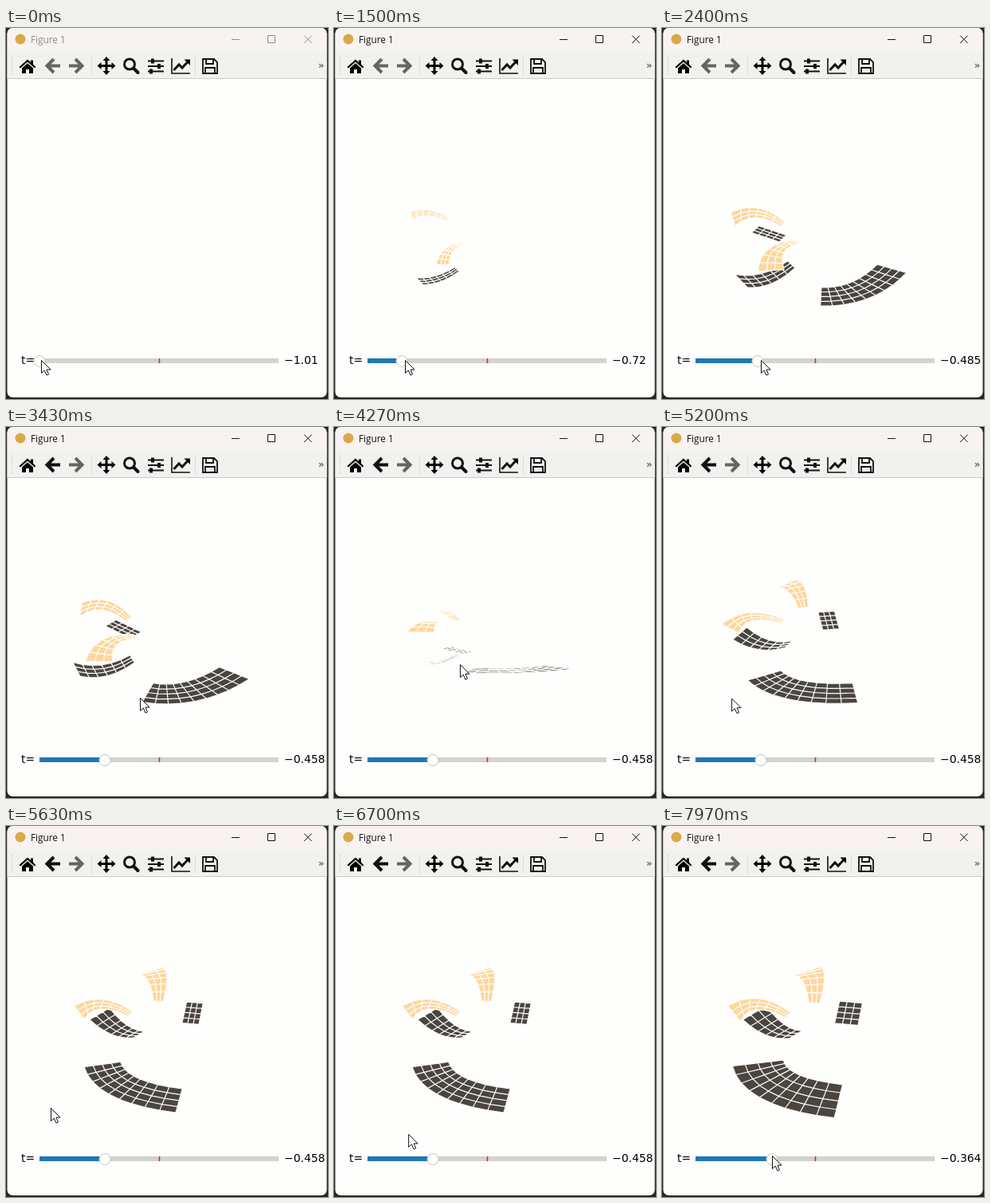
Animation, 404 px wide and 466 px high, one loop 8 s. Source, as an HTML page:

```html
<!DOCTYPE html>
<html lang="en">
<head>
<meta charset="utf-8">
<title>Figure 1</title>
<style>
html, body { margin: 0; width: 100%; height: 100%; overflow: hidden; background: #262622; }
svg { display: block; width: 404px; height: 466px; }
.plot { font: 13.9px "DejaVu Sans", sans-serif; }
.title { font: 11.8px "Open Sans", sans-serif; }
.line { fill: none; stroke: #111; }
</style>
</head>
<body>
<svg viewBox="0 0 404 466">
  <defs>
    <linearGradient id="bar" x1="0" y1="0" x2="0" y2="1">
      <stop offset=".4" stop-color="#f8f3f0"/>
      <stop offset=".55" stop-color="#f1f1ef"/>
    </linearGradient>
    <clipPath id="win"><rect x="1.5" width="401" height="464" rx="7"/></clipPath>
  </defs>
  <g clip-path="url(#win)">
    <rect width="404" height="466" fill="#fefefc"/>
    <rect width="404" height="64" fill="url(#bar)"/>
    <path d="M0 63.5H404" stroke="#cbcbc2"/>
  </g>

  <circle cx="18" cy="14" r="6.5" fill="#d9a94c"/>
  <g id="caption">
    <text class="title" x="31" y="18.5">Figure 1</text>
    <path fill="none" stroke="currentColor" d="M283 14.5H293M328.5 9.5H337.5V18.5H328.5ZM374 9.5L383.5 19M383.5 9.5L374 19"/>
  </g>

  <path d="M7.5 36V60" stroke="#b5b5ac" stroke-dasharray="1 2"/>
  <path d="M107.5 36V60M237.5 36V60" stroke="#dcdcd6"/>
  <path d="M16.5 49L27 39.5L31 43V40.5H34V45.8L37.5 49L36 50.5L27 42.5L18 50.5ZM20 50.5L27 44.3L34 50.5V57H29V52H25V57H20Z"/>
  <g fill="none" stroke-width="4">
    <path id="back" d="M68 47.5H52M60 39L51.5 47.5L60 56"/>
    <path stroke="#666660" d="M79 47.5H95M87 39L95.5 47.5L87 56"/>
  </g>
  <path d="M126 36L130.5 41H127.5V46H132.5V43L137.5 47.5L132.5 52V49H127.5V54H130.5L126 59L121.5 54H124.5V49H119.5V52L114.5 47.5L119.5 43V46H124.5V41H121.5Z"/>
  <circle class="line" cx="155" cy="45.5" r="6.5" stroke-width="3"/>
  <path class="line" stroke-width="4" stroke-linecap="round" d="M160.5 51L165.5 56"/>
  <path class="line" stroke-width="2" d="M178 41.5H198M178 48H198M178 54.5H198"/>
  <path class="line" stroke-width="4" d="M184 38.5V44.5M192 45V51M182 51.5V57.5"/>
  <path class="line" stroke-width="1.6" d="M208 38V57H231"/>
  <path class="line" stroke-width="3" d="M210.5 53L217 46L221 50L228.5 42"/>
  <path d="M223.5 39.5H231V47Z"/>
  <path class="line" stroke-width="1.8" d="M247 39H261L265 43V57H247ZM251 39V45H260V39M250 57V50H262V57"/>
  <text x="391.5" y="50.5" font-family="DejaVu Sans, sans-serif" font-size="13" fill="#444">»</text>

  <g id="mesh" stroke="#fefefc" stroke-width="1.2" stroke-linejoin="round"></g>

  <g class="plot">
    <text x="19" y="422">t=</text>
    <text id="value" x="349" y="422"></text>
  </g>
  <rect x="42" y="415" width="300" height="6" fill="#d3d3cd"/>
  <rect id="fill" x="42" y="415" height="6" fill="#1f77b4"/>
  <path d="M192.5 415V421" stroke="#e02010" stroke-width="1.5"/>
  <circle id="knob" cy="418.5" r="7" fill="#fefefc" stroke="#c6c6be"/>
  <path id="cursor" d="M0 0V16L3.8 12.6L6.4 18.6L9 17.5L6.5 11.6H11.5Z" fill="#fefefc" stroke="#111"/>
</svg>
<script>
const LOOP = 8000, CX = 205, CY = 266, DIST = 1600;
const DARK = "#4b4540", LIGHT = "#fdd79e";
const RAD = Math.PI / 180, TURN = 180 / 330 * RAD;
const PRESS = 3000, RELEASE = 5630;
const $ = id => document.getElementById(id);

// Level bands along mid + dir*s + bend*s², axes: right, toward the viewer, down
const bands = [
  { color: DARK, birth: -0.7, half: 11, taper: 0,
    mid: [-60, -68, 23], dir: [17, 13, 2], bend: [0, 0, 0] },
  { color: LIGHT, birth: -1.01, half: 13, taper: 0.5,
    mid: [-82, -27, -34], dir: [31, 10, 2], bend: [0, 5, 11] },
  { color: DARK, birth: -1.01, half: 14, taper: 0.3,
    mid: [-80, 30, 28], dir: [34, -11, -1], bend: [0, 0, -9] },
  { color: LIGHT, birth: -1.01, half: 11, taper: 0.5,
    mid: [-73, 58, -27], dir: [21, -26, -3], bend: [10, 1, 8] },
  { color: DARK, birth: -0.7, half: 23, taper: 0,
    mid: [27, 76, 30], dir: [53, -25, 1], bend: [0, -20, 0] }
];

for (const b of bands) {
  b.cols = Math.round(Math.hypot(...b.dir) / 9) + 2;
  b.rows = Math.round(b.half / 10) + 2;
  b.el = document.createElementNS("http://www.w3.org/2000/svg", "path");
  b.el.setAttribute("fill", b.color);
  $("mesh").append(b.el);
}

// Pointer between the two slider drags: [time, x, y]
const path = [
  [2500, 128, 417], [PRESS, 190, 343], [3430, 168, 340], [4270, 158, 298],
  [4830, 114, 329], [RELEASE, 56, 354], [6100, 56, 354], [7200, 124, 414]
];

const ramp = (time, from, to) => Math.min(1, Math.max(0, (time - from) / (to - from)));

function follow(time) {
  const i = Math.max(1, path.findIndex(p => p[0] > time));
  const [t0, x0, y0] = path[i - 1], [t1, x1, y1] = path[i];
  const k = ramp(time, t0, t1);
  return [x0 + (x1 - x0) * k, y0 + (y1 - y0) * k];
}

function pointer(time, knob) {
  if (time < 2500) return [knob + 2 + 2 * ramp(time, 400, 1000), 417];
  if (time >= 7200) return [knob, 414];
  return follow(time);
}

function project([u, d, z], azim, elev) {
  const x = u * Math.cos(azim) - d * Math.sin(azim);
  const near = d * Math.cos(azim) + u * Math.sin(azim);
  const y = z * Math.cos(elev) + near * Math.sin(elev);
  const s = 1 / (1 - near * Math.cos(elev) / DIST);
  return (CX + x * s).toFixed(1) + " " + (CY + y * s).toFixed(1);
}

// Offset r along the horizontal normal of the centre line at s
function surface(b, s, r) {
  const [u, d, z] = b.mid.map((m, i) => m + b.dir[i] * s + b.bend[i] * s * s);
  const tu = b.dir[0] + 2 * b.bend[0] * s, td = b.dir[1] + 2 * b.bend[1] * s;
  const w = b.half * (1 - b.taper * s) * r / Math.hypot(tu, td);
  return [u - td * w, d + tu * w, z];
}

function meshPath(b, t, azim, elev) {
  const wide = Math.max(0, (t - b.birth) / (-0.458 - b.birth));
  const long = Math.min(1.05, Math.sqrt(wide));
  if (wide < 0.02) return "";
  const at = (i, j) => project(
    surface(b, (2 * i / b.cols - 1) * long, (2 * j / b.rows - 1) * wide), azim, elev);
  let d = "";
  for (let i = 0; i < b.cols; i++)
    for (let j = 0; j < b.rows; j++)
      d += `M${at(i, j)}L${at(i + 1, j)}L${at(i + 1, j + 1)}L${at(i, j + 1)}Z`;
  return d;
}

function draw(time) {
  const knob = Math.round(42 + 82 * ramp(time, 400, 2500) + 14 * ramp(time, 7450, 7960));
  const t = (knob - 42) / 300 * 2.02 - 1.01;
  const [mx, my] = pointer(time, knob);

  const [dx, dy] = follow(Math.min(RELEASE - 1, Math.max(PRESS, time)));
  const azim = (168 - dx) * TURN;
  const elev = 30 * RAD + (dy - 342) * TURN;
  for (const b of bands) b.el.setAttribute("d", meshPath(b, t, azim, elev));

  $("value").textContent = String(+t.toPrecision(3)).replace("-", "\u2212");
  $("fill").setAttribute("width", knob - 42);
  $("knob").setAttribute("cx", knob);
  $("cursor").setAttribute("transform", `translate(${mx + 0.5} ${my + 0.5})`);
  const ink = time < 250 ? "#8d8d88" : "#111";
  $("caption").setAttribute("color", ink);
  $("caption").setAttribute("fill", ink);
  $("back").setAttribute("stroke", time < PRESS ? "#666660" : "#111");
}

const start = performance.now();
function tick() {
  draw((performance.now() - start) % LOOP);
  requestAnimationFrame(tick);
}
tick();
</script>
</body>
</html>
```
